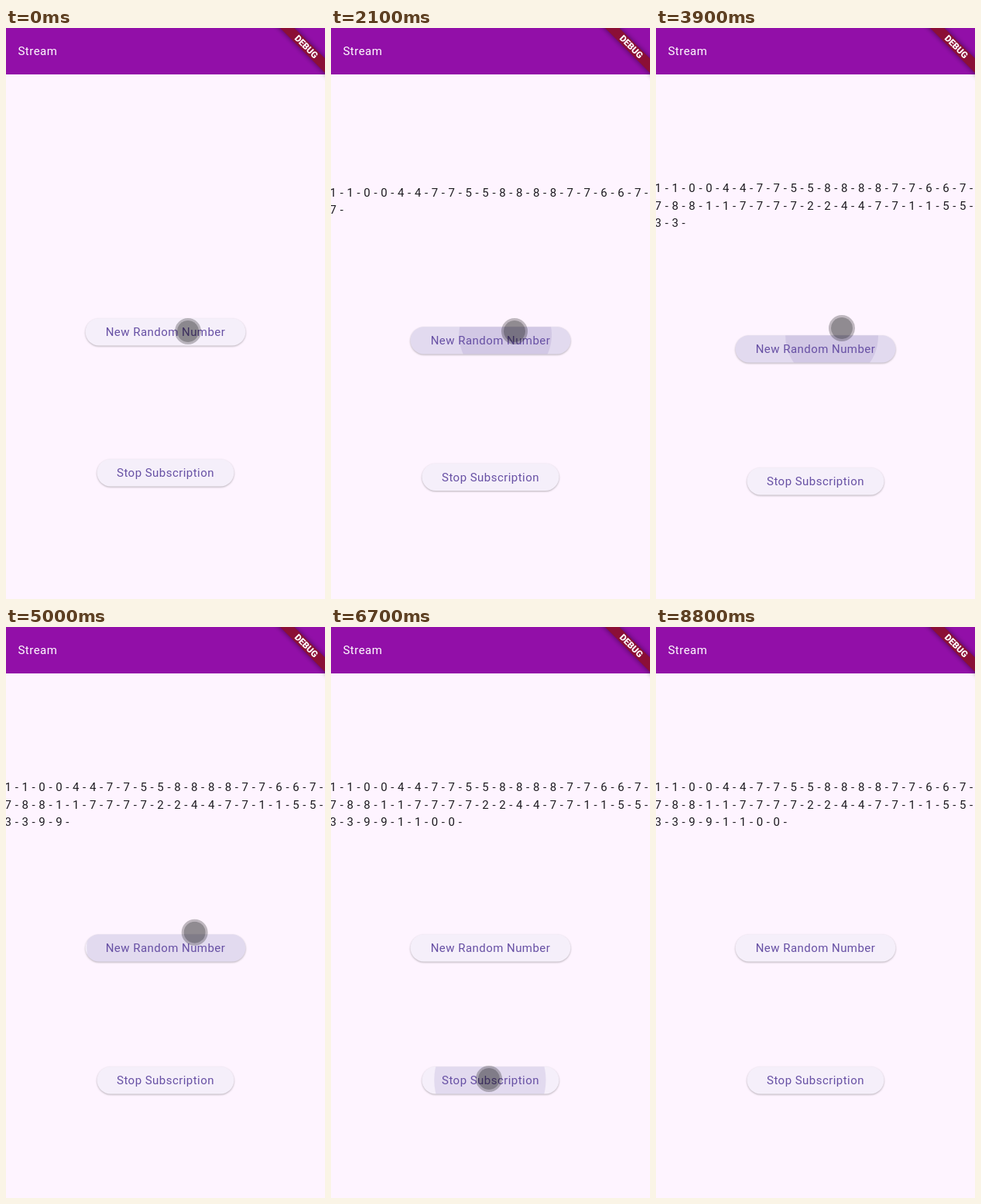
These frames come from a looping animation (412x738 px, 8900 ms). An HTML page:

```html
<!DOCTYPE html>
<html lang="en">
<head>
<meta charset="utf-8">
<title>Stream</title>
<style>
  html, body { margin: 0; width: 100%; height: 100%; overflow: hidden; background: #fef4ff; }
  svg { display: block; width: 100%; height: 100%; }
  text { font: 15px Roboto, sans-serif; letter-spacing: .46px; white-space: pre; }
  .label { fill: #6750a4; text-anchor: middle; }
  .digits { fill: #1d1b20; }
  .face { fill: #f5effa; filter: drop-shadow(0 1px .8px rgba(0, 0, 0, .28)); }
  .ripple { fill: #6750a4; }
  .debug { font-size: 11.6px; font-weight: 900; letter-spacing: 0; fill: #fff; text-anchor: middle; }
</style>
</head>
<body>
<svg id="stage" viewBox="0 0 412 738">
  <defs>
    <filter id="soft" x="-20%" y="-100%" width="140%" height="300%">
      <feGaussianBlur stdDeviation="3.5"/>
    </filter>
    <clipPath id="screen"><rect width="412" height="738"/></clipPath>
  </defs>
  <rect width="412" height="738" fill="#fef4ff"/>
  <rect width="412" height="60" fill="#920fa8"/>
  <text x="15.5" y="34.8" fill="#fff">Stream</text>
  <g id="body"></g>
  <g id="cursor">
    <circle r="14" fill="#000" fill-opacity=".43"/>
    <circle r="15.5" fill="none" stroke="#000" stroke-opacity=".25" stroke-width="3"/>
  </g>
  <g clip-path="url(#screen)">
    <g transform="translate(412 0) rotate(45)">
      <rect x="-60" y="28" width="120" height="13" fill="#000" fill-opacity=".5" filter="url(#soft)"/>
      <rect x="-60" y="28" width="120" height="13" fill="#8b0f36"/>
      <text class="debug" y="38.2">DEBUG</text>
    </g>
  </g>
</svg>
<script>
const LOOP = 8900, STEP = 100;
const PER_LINE = 19, LINE = 22.2, HOLD = 80;
const GROW = 225, FADE = 375, SPLASH = 0.13;

const numbers = [...'10475887678177247153910'];
const body = document.getElementById('body');
const cursor = document.getElementById('cursor');

// Release times: steady fast tapping, then three slow taps
const taps = numbers.map((_, i) => 445 + i * 180);
taps.splice(20, 3, 4850, 5490, 6150);

const path = [
  [0, 235, 392], [1100, 235, 392], [2100, 237, 392], [3900, 240, 388],
  [5700, 246, 399], [6200, 246, 399], [6500, 204, 584]
];
const CURSOR_END = 7000;

function add(parent, tag, attrs, text) {
  const el = document.createElementNS('http://www.w3.org/2000/svg', tag);
  for (const key in attrs) el.setAttribute(key, attrs[key]);
  if (text) el.textContent = text;
  parent.appendChild(el);
  return el;
}

function set(el, attrs) {
  for (const key in attrs) el.setAttribute(key, attrs[key]);
}

const lerp = (a, b, p) => a + (b - a) * p;
const clamp = v => Math.max(0, Math.min(1, v));

// cubic-bezier(.25, .1, .25, 1)
function ease(x) {
  if (x <= 0 || x >= 1) return clamp(x);
  const bez = (a, b, s) => 3 * a * s * (1 - s) ** 2 + 3 * b * s * s * (1 - s) + s ** 3;
  let lo = 0, hi = 1;
  for (let i = 0; i < 24; i++) {
    const mid = (lo + hi) / 2;
    if (bez(0.25, 0.25, mid) < x) lo = mid; else hi = mid;
  }
  return bez(0.1, 1, lo);
}

function pointerAt(t) {
  const i = path.findIndex(p => p[0] > t);
  if (i < 0) return path[path.length - 1].slice(1);
  const a = path[i - 1], b = path[i];
  const p = (t - a[0]) / (b[0] - a[0]);
  return [lerp(a[1], b[1], p), lerp(a[2], b[2], p)];
}

function makeButton(id, label, width, y, shift, times) {
  const group = add(body, 'g');
  const shape = { x: -width / 2, y: -17.8, width, height: 35.3, rx: 17.65 };
  add(add(group, 'clipPath', { id }), 'rect', shape);
  add(group, 'rect', { class: 'face', ...shape });
  const ink = add(group, 'g', { 'clip-path': `url(#${id})` });
  const pool = [0, 1, 2, 3].map(() => add(ink, 'circle', { class: 'ripple' }));
  add(group, 'text', { class: 'label', y: 5.3 }, label);
  const full = Math.hypot(width, 48) / 2;

  return (t, extra) => {
    const cy = y + shift * extra;
    set(group, { transform: `translate(206 ${cy})` });
    const live = times.filter(up => t >= up - HOLD && t < up + FADE);
    pool.forEach((circle, i) => {
      if (i >= live.length) return set(circle, { r: 0 });
      const down = live[i] - HOLD, age = t - live[i];
      const held = Math.min(t - down, HOLD) / 1000;
      const p = ease(held + Math.max(0, age) / GROW);
      const [px, py] = pointerAt(down);
      const fadeIn = clamp((t - down) / 75);
      const fadeOut = 1 - clamp((age - GROW) / (FADE - GROW));
      set(circle, {
        cx: (px - 206) * (1 - p),
        cy: (py - cy) * (1 - p),
        r: full * lerp(0.3, 1, p),
        'fill-opacity': SPLASH * fadeIn * fadeOut
      });
    });
  };
}

const rows = [0, 1, 2].map(() => add(body, 'text', { class: 'digits' }));
const buttons = [
  makeButton('clipNew', 'New Random Number', 207, 393, 11, taps),
  makeButton('clipStop', 'Stop Subscription', 177, 575, 5.5, [6626])
];

function drawDigits(t) {
  const shown = numbers.filter((_, i) => taps[i] <= t).flatMap(n => [n, n]);
  const extra = Math.max(1, Math.ceil(shown.length / PER_LINE)) - 1;
  rows.forEach((row, i) => {
    const part = shown.slice(i * PER_LINE, (i + 1) * PER_LINE);
    row.textContent = part.map(n => n + ' - ').join('');
    set(row, {
      x: extra ? -1.4 : 206,
      y: 223.4 - 5.5 * extra + LINE * i,
      'text-anchor': extra ? 'start' : 'middle'
    });
  });
  return extra;
}

function draw(t) {
  const extra = drawDigits(t);
  buttons.forEach(update => update(t, extra));
  set(cursor, {
    transform: `translate(${pointerAt(t)})`,
    visibility: t < CURSOR_END ? 'visible' : 'hidden'
  });
}

const start = performance.now();
function tick() {
  const t = (performance.now() - start) % LOOP;
  draw(Math.floor(t / STEP) * STEP);
  requestAnimationFrame(tick);
}
tick();
</script>
</body>
</html>
```
